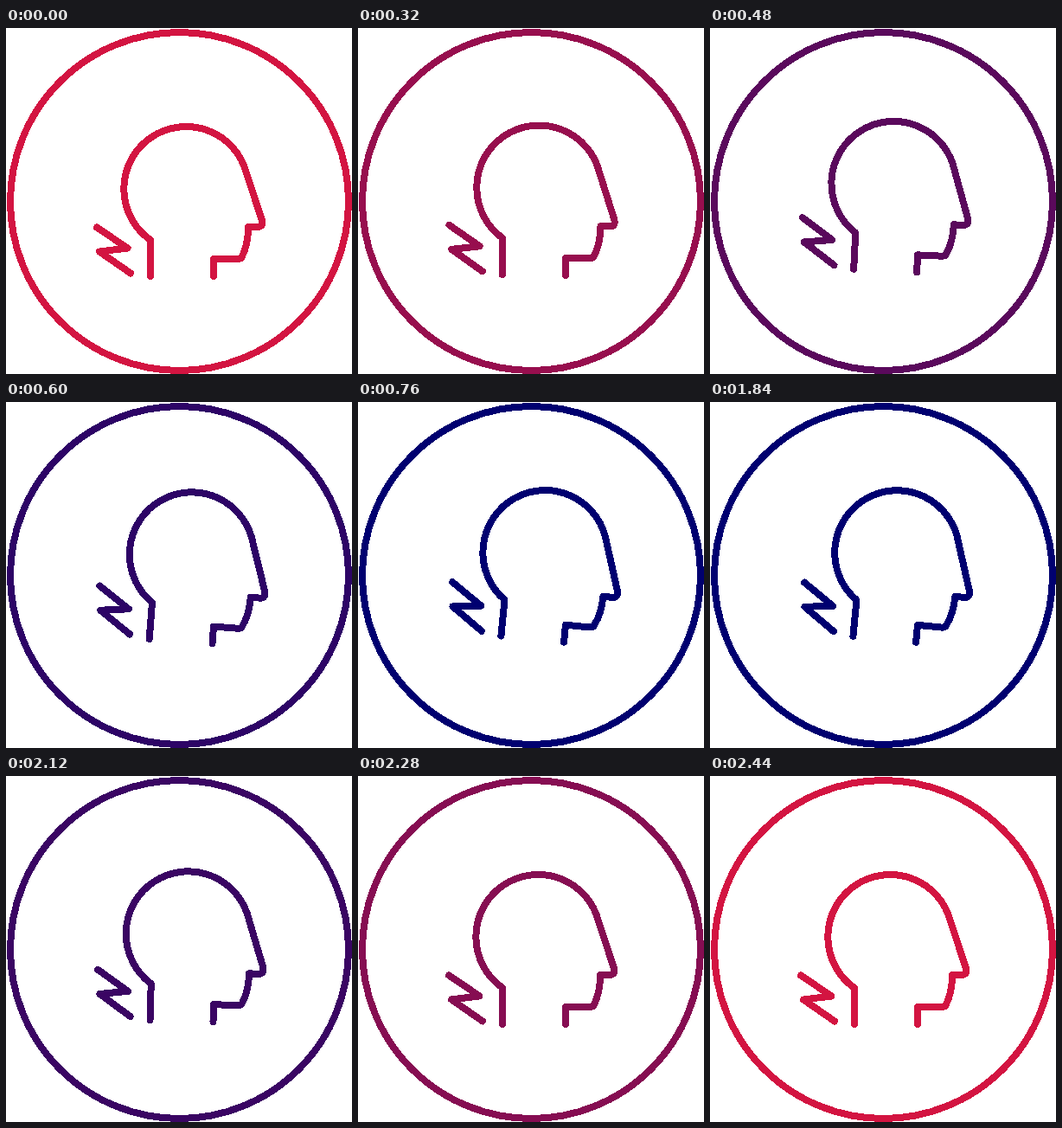
An HTML page that plays this animation: 400x400 px, repeating every 2640 ms.

```html
<!DOCTYPE html>
<html lang="en">
<head>
<meta charset="utf-8">
<title>Neck pain icon</title>
<style>
  html, body { margin: 0; width: 100%; height: 100%; overflow: hidden; background: #fff; }
  svg { display: block; width: 100%; height: 100%; }
  svg * { fill: none; stroke-width: 8; stroke-linecap: round; stroke-linejoin: round; shape-rendering: crispEdges; }
</style>
</head>
<body>
<svg id="icon" viewBox="0 0 400 400">
  <circle cx="200.5" cy="200.5" r="195.5"/>
  <g id="figure">
    <path d="M167 287V245A72 72 0 1 1 278 168L295.8 222Q297.5 230 291 230H280C280 243 277 256 273 264Q272 267 268 267H240V287"/>
    <path id="front" d="M105 230.5L140.5 254.5L108 258.5L144 283.5"/>
    <path id="back" d="M144 283.5L108 258.5L140.5 254.5L105 230.5"/>
  </g>
</svg>
<script>
const LOOP = 2640, TICK = 40;
const RED = [211, 20, 65], NAVY = [0, 0, 112];
const $ = id => document.getElementById(id);
const icon = $('icon'), figure = $('figure'), front = $('front'), back = $('back');
const boltLen = front.getTotalLength();
const gap = boltLen - 8;

const ramp = (t, from, to) => Math.min(1, Math.max(0, (t - from) / (to - from)));
const ease = p => p * p * (3 - 2 * p);

// Shows the first len units of a stroke; short pieces are thinner.
function trim(path, len) {
  path.style.visibility = len > 0 ? 'visible' : 'hidden';
  path.style.strokeDasharray = len >= boltLen ? 'none' : `${Math.max(0, len)} 999`;
  path.style.strokeWidth = Math.min(8, 5.5 + len * 0.16);
}

function draw(t) {
  const tilt = ease(ramp(t, 200, 760)) - ease(ramp(t, 1800, 2300));
  const tint = ramp(t, 160, 720) - ramp(t, 2000, 2440);
  const shift = ramp(t, 800, 1710) * (boltLen + gap);

  const rgb = RED.map((c, i) => Math.round(c + (NAVY[i] - c) * tint));
  icon.style.stroke = `rgb(${rgb})`;
  figure.setAttribute('transform',
    `translate(${-1.6 * tilt} ${-16.5 * tilt}) rotate(${5.6 * tilt} 167 287)`);
  trim(front, boltLen - shift);
  trim(back, shift - gap);
}

const start = performance.now();
function frame() {
  const t = (performance.now() - start) % LOOP;
  draw(Math.floor(t / TICK) * TICK);
  requestAnimationFrame(frame);
}
frame();
</script>
</body>
</html>
```
